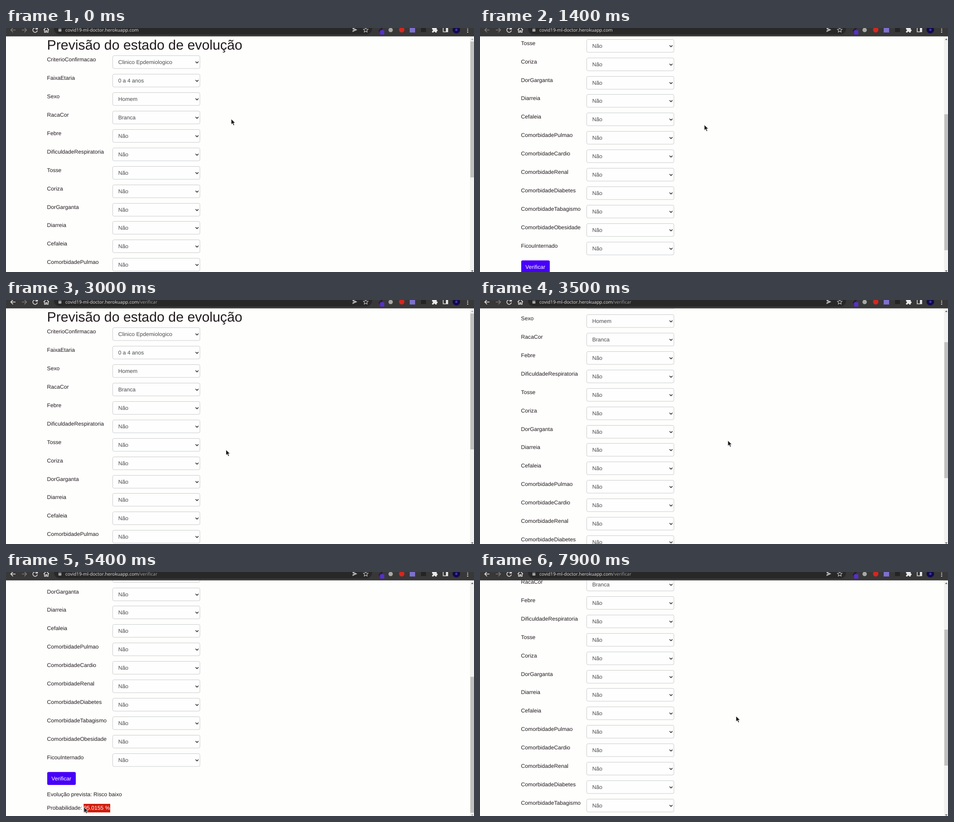
These frames come from a looping animation (1033 px wide and 542 px high, 8000 ms). An HTML page:

```html
<!DOCTYPE html>
<html lang="pt">
<head>
<meta charset="utf-8">
<title>Previsão do estado de evolução</title>
<style>
  html, body { margin: 0; width: 100%; height: 100%; overflow: hidden; background: #fefefd; }
  svg { display: block; width: 1033px; height: 542px; }
  text { font-family: "Liberation Sans", Arial, sans-serif; font-size: 12.13px; fill: #221a1d;
    text-rendering: geometricPrecision; white-space: pre; }
  .title { font-size: 30.3px; }
  .value { fill: #4a4b4d; }
  .light { fill: #fff; }
  .url { font: 10.05px "Open Sans", "Noto Sans", sans-serif; fill: #e9e9ea; }
  .line { fill: none; stroke: #e4e4e4; stroke-width: 1.5; }
</style>
</head>
<body>
<svg viewBox="0 0 1033 542">
  <defs><clipPath id="selClip"><rect id="clipBox" y="869" height="19"/></clipPath></defs>
  <rect width="1033" height="542" fill="#fefefd"/>

  <g id="page">
    <text class="title" x="90.5" y="47.8">Previsão do estado de evolução</text>
    <g id="rows"></g>
    <rect id="button" x="91" y="798.3" width="63" height="28.6" rx="3"/>
    <text class="light" x="100.3" y="816.6">Verificar</text>
    <text x="90.6" y="852.1">Evolução prevista: Risco baixo</text>
    <text class="prob" x="90.6" y="882.2"></text>
    <rect id="selection" y="869" height="19" fill="#d01c0c"/>
    <text class="prob light" x="90.6" y="882.2" clip-path="url(#selClip)"></text>
  </g>

  <rect x="1024" y="18" width="9" height="524" fill="#f1f1f0"/>
  <rect id="thumb" x="1025" width="8" height="302" fill="#c0c0bf"/>
  <path id="upArrow" d="M1026.5 26.5l2.7-3 2.7 3z"/>
  <path id="downArrow" d="M1026.5 538.5l2.7 3 2.7-3z"/>

  <g id="toolbar">
    <rect width="1033" height="18.6" fill="#383838"/>
    <rect x="106" y="-12" width="702" height="26.5" rx="13" fill="#282829"/>
    <path id="back" class="line" d="M21 4.5H11M15.5 -.5l-5 5 5 5"/>
    <path class="line" style="stroke:#7d7d7d" d="M35 4.5h10M40.500 -.5l5 5-5 5"/>
    <path class="line" d="M68.500 2A5 5 0 1 0 69.200 5.500M69.500 -2v4.500h-4.500"/>
    <path class="line" d="M83 4.500l6-6 6 6M85 3.500v6h2.800v-3.500h2.400v3.500H93v-6"/>
    <rect x="115.700" y="2.500" width="6.600" height="5.500" rx=".7" fill="#a5a5a6"/>
    <path class="line" style="stroke:#a5a5a6;stroke-width:1" d="M117.200 3V1.200a1.800 1.800 0 0 1 3.600 0V3"/>
    <path d="M764.500 -1l11 5-11 5 1-4 5-1-5-1z" fill="#bdbdbe"/>
    <path class="line" style="stroke:#c6c6c7;stroke-width:1.100"
      d="M794 -1l1.600 3.500 3.700.4-2.800 2.500.8 3.700-3.300-1.900-3.300 1.900.8-3.700-2.800-2.500 3.700-.4z"/>
    <path d="M822 8l1-3 6-6 3 2-7 6z" fill="#202020"/>
    <rect x="826" y="5" width="9" height="9.500" fill="#592bda"/>
    <circle cx="849" cy="4.500" r="4.800" fill="#a8a8a7"/>
    <circle cx="873.500" cy="4" r="6" fill="#d9251f"/>
    <rect x="891" y="-2" width="12" height="12" fill="#7f6fce"/>
    <rect x="916" y="-1" width="11" height="10" fill="#222523"/>
    <path d="M940.500 0h3.200a2 2 0 0 1 4 0h3v3.300a2 2 0 0 1 0 4V10h-3.300a1.900 1.900 0 0 0-3.800 0h-3.100V7a1.900 1.900 0 0 0 0-3.800z" fill="#e9e9e9"/>
    <rect class="line" x="965" y="-1" width="10" height="9.500"/>
    <rect x="971" y="-1" width="4.500" height="10" fill="#e4e4e4"/>
    <circle cx="994" cy="4" r="8.300" fill="#100b4a"/>
    <circle cx="994" cy="4" r="2.500" fill="#4935ad"/>
    <g fill="#e4e4e4">
      <circle cx="1019" cy="0" r="1.300"/><circle cx="1019" cy="4.500" r="1.300"/><circle cx="1019" cy="9" r="1.300"/>
    </g>
    <text class="url" x="131" y="7.700">covid19-ml-doctor.herokuapp.com<tspan id="route" fill="#a1a2a4"></tspan></text>
  </g>

  <path id="arrow" d="M0 0v12.500l2.900-2.700 2.100 4.800 2.300-1-2.100-4.600h4z"
    fill="#1b1b1b" stroke="#fff" stroke-width=".9"/>
  <path id="hand" d="M2.600 8.500V1.500a1.200 1.200 0 0 1 2.400 0V5l4.500 1q1.800.5 1.700 2.300l-.8 4-1 2.300H4.200L.3 9.700q-.7-1.500.6-1.800z"
    fill="#fff" stroke="#111" stroke-width=".9"/>
</svg>

<script>
const LOOP = 8000, STEP = 100, SUBMIT = 2400;
const $ = id => document.getElementById(id);
const set = (el, attrs) => { for (const k in attrs) el.setAttribute(k, attrs[k]); };

const labels = ["CriterioConfirmacao", "FaixaEtaria", "Sexo", "RacaCor", "Febre", "DificuldadeRespiratoria",
  "Tosse", "Coriza", "DorGarganta", "Diarreia", "Cefaleia",
  ...["Pulmao", "Cardio", "Renal", "Diabetes", "Tabagismo", "Obesidade"].map(s => "Comorbidade" + s),
  "FicouInternado"];
const values = ["Clinico Epdemiologico", "0 a 4 anos", "Homem", "Branca"];

$("rows").innerHTML = labels.map((label, i) => `
  <g transform="translate(0 ${Math.round(i * 40.94)})">
    <text x="90.6" y="74.4">${label}</text>
    <rect x="235.5" y="61.5" width="192.500" height="28.500" rx="3" fill="#fefefe" stroke="#c9cacc"/>
    <text class="value" x="247.700" y="80.400">${values[i] || "Não"}</text>
    <path d="M418.300 74.500l3.300 3.200 3.300-3.200" fill="none" stroke="#3a3a3a" stroke-width="1.700"/>
  </g>`).join("");

// Keyframes: [time, value, ...], linear in between.
const scrollKeys = [[0, 0], [500, 0], [600, 30], [700, 57], [900, 57], [1400, 282], [1500, 330], [1600, 354],
  [2300, 354], [SUBMIT, 0], [3200, 0], [3300, 20], [3500, 111], [3900, 322], [4000, 343], [4100, 354],
  [7500, 354], [7600, 325], [7900, 171]];
const pointerKeys = [[0, 497, 202], [500, 497, 202], [700, 495, 215], [1600, 495, 215], [1800, 477, 245],
  [2000, 180, 415], [2100, 116, 456], [SUBMIT, 116, 456], [3100, 547, 312], [4100, 547, 312],
  [4200, 486, 379], [4300, 486, 379], [4400, 287, 467], [4500, 287, 467], [4900, 230, 522],
  [5400, 172, 522], [6000, 520, 353], [6500, 520, 353], [6700, 303, 488], [6900, 303, 488], [7500, 565, 320]];

function sample(keys, t) {
  const n = keys.findIndex(k => k[0] > t);
  if (n < 0) return keys[keys.length - 1].slice(1);
  const a = keys[n - 1], b = keys[n], f = (t - a[0]) / (b[0] - a[0]);
  return a.slice(1).map((v, i) => v + (b[i + 1] - v) * f);
}

function render(t) {
  const scroll = Math.round(sample(scrollKeys, t)[0]);
  const [x, y] = sample(pointerKeys, t);
  const submitted = t >= SUBMIT;
  const hover = t >= 2100 && !submitted;

  set($("page"), { transform: `translate(0 ${-scroll})` });
  set($("thumb"), { y: 30 + scroll * 0.573 });
  set($("upArrow"), { fill: scroll > 0 ? "#505050" : "#a5a5a5" });
  set($("downArrow"), { fill: scroll < 354 ? "#505050" : "#a5a5a5" });
  set($("button"), { fill: hover ? "#3a00cd" : "#4700f8" });
  set($("back"), { style: `stroke:${submitted ? "#e9e9e9" : "#7d7d7d"}` });
  $("route").textContent = submitted ? "/verificar" : "";
  for (const el of document.querySelectorAll(".prob"))
    el.textContent = submitted ? "Probabilidade: 95.0155 %" : "Probabilidade: %";

  const selecting = t >= 4900 && t < 6900;
  const left = t < 5400 ? Math.max(171.3, x) : 171.3;
  const span = { x: left, width: selecting ? Math.max(0, 230 - left) : 0 };
  set($("selection"), span);
  set($("clipBox"), span);

  set($("arrow"), { transform: `translate(${x} ${y})`, visibility: hover ? "hidden" : "visible" });
  set($("hand"), { transform: `translate(${x - 2.5} ${y - 1})`, visibility: hover ? "visible" : "hidden" });
}

const start = performance.now();
function tick() {
  const t = (performance.now() - start) % LOOP;
  render(Math.floor(t / STEP) * STEP);
  requestAnimationFrame(tick);
}
tick();
</script>
</body>
</html>
```
